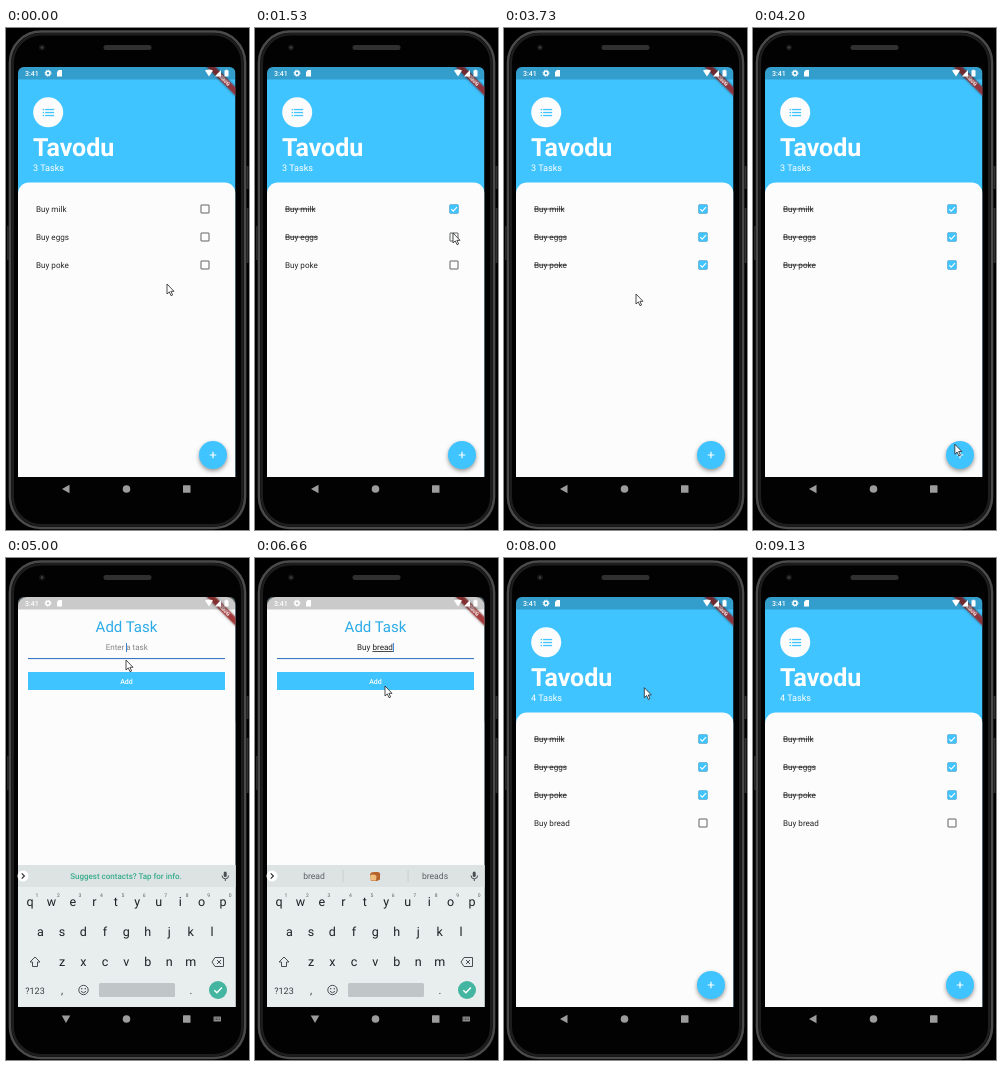
Animation of 243 by 502 pixels, one loop 9200 ms. Source, as an HTML page:

```html
<!DOCTYPE html>
<html lang="en">
<head>
<meta charset="utf-8">
<style>
html, body { margin: 0; width: 100%; height: 100%; overflow: hidden; background: #000; }
svg { display: block; width: 243px; height: 502px; font-family: Roboto, sans-serif; }
text { white-space: pre; text-rendering: geometricPrecision; }
.mid { text-anchor: middle; }
.done { text-decoration: line-through; }
.line { fill: none; stroke: #4a4e50; stroke-width: 1; }
</style>
</head>
<body>
<svg id="stage" viewBox="0 0 243 502"></svg>
<script>
const LOOP = 9200, BLUE = '#40c4ff', PAPER = '#fcfcfc';
const TOGGLES = [850, 1510, 2660];
const TYPED = 'Buy bread', TYPE_START = 5190, TYPE_STEP = 125;
const SUBMIT = 7260;
// Pointer stops: time, x, y
const PATH = [
  [0, 161, 256], [60, 161, 256], [600, 198, 178], [1200, 198, 178], [1330, 198, 205],
  [2130, 198, 205], [2460, 198, 234], [3530, 198, 234], [3730, 132, 266], [3860, 132, 266],
  [4250, 205, 423], [4480, 205, 423], [5000, 120, 102], [6150, 120, 102], [6460, 130, 128],
  [7250, 130, 128], [7460, 138, 124], [7900, 138, 124], [8460, 165, 190]
];

const $ = id => document.getElementById(id);
const clamp = v => Math.max(0, Math.min(1, v));
const attr = (id, values) => { for (const k in values) $(id).setAttribute(k, values[k]); };
const show = (id, on) => $(id).style.display = on ? '' : 'none';
const text = (x, y, size, fill, str, extra = '') =>
  `<text x="${x}" y="${y}" font-size="${size}" fill="${fill}" ${extra}>${str}</text>`;
const mid = (x, y, size, fill, str, extra = '') => text(x, y, size, fill, str, 'class="mid" ' + extra);
const rect = (x, y, w, h, fill, extra = '') =>
  `<rect x="${x}" y="${y}" width="${w}" height="${h}" fill="${fill}" ${extra}/>`;
const circle = (x, y, r, fill, extra = '') => `<circle cx="${x}" cy="${y}" r="${r}" fill="${fill}" ${extra}/>`;
const path = (d, fill, extra = '') => `<path d="${d}" fill="${fill}" ${extra}/>`;

const phone = () =>
  rect(0, 0, 243, 502, '#000') +
  rect(4, 3.5, 235, 496.5, '#020202', 'rx="31" stroke="#4a4a4a" stroke-width="2.6"') +
  rect(6.8, 6.3, 229.4, 491, 'none', 'rx="28.5" stroke="#1d1d1d" stroke-width="2.4"') +
  rect(97.5, 17, 48, 5, '#303030', 'rx="2.5"') +
  circle(36, 19.5, 3, '#151515') + circle(36, 19.5, 1.3, '#3c4046') +
  rect(1, 198, 2, 34, '#262626') + rect(240.5, 138, 2, 23, '#303030') + rect(240.5, 180, 2, 55, '#303030');

const task = (name, i) => {
  const y = 181 + 28 * i;
  return `<g id="task${i}">` + text(30, y + 2.7, 8.1, '#242424', name, `id="name${i}"`) +
    circle(199, y, 0, '#000', `id="ripple${i}"`) +
    rect(195, y - 4, 8, 8, 'none', 'rx=".2" stroke="#626262"') +
    `<g id="fill${i}">${rect(194.5, y - 4.5, 9, 9, BLUE, 'rx=".4"')}</g>` +
    path(`M196.3 ${y + .1}l1.9 2 3.8-4`, 'none', `id="tick${i}" stroke="#fff" stroke-width="1.1" pathLength="1" stroke-dasharray="1 2"`) + '</g>';
};

const home = () =>
  rect(12, 39, 217.5, 410, BLUE) + circle(42.2, 84.3, 15, PAPER) +
  [81.5, 84.5, 87.5].map(y => rect(36.6, y - .6, 1.5, 1.3, BLUE) + rect(39.1, y - .6, 9, 1.3, BLUE)).join('') +
  text(27, 127.5, 25, '#fff', 'Tavodu', 'font-weight="700"') +
  text(27, 142.5, 9.1, '#fff', '', 'id="count"') +
  path('M12 449V165.5a11 11 0 0 1 11-11H218.5a11 11 0 0 1 11 11V449Z', PAPER) +
  ['Buy milk', 'Buy eggs', 'Buy poke', TYPED].map(task).join('') +
  `<g style="filter:drop-shadow(0 2px 2px #0006)">${circle(207, 427, 14, BLUE)}</g>` +
  path('M203.7 427h6.6M207 423.7v6.6', 'none', 'stroke="#fff" stroke-width="1.2"');

const sheet = () =>
  rect(12, 39, 217.5, 412, '#757575') +
  path('M12 451V48a9 9 0 0 1 9-9H220.5a9 9 0 0 1 9 9V451Z', PAPER) +
  mid(120.5, 73.5, 15, '#2cabe8', 'Add Task') +
  mid(120.7, 92, 8, '#858585', 'Enter a task', 'id="hint"') +
  mid(120, 92, 8.1, '#222', '<tspan id="head"></tspan><tspan id="word" text-decoration="underline"></tspan>', 'id="entry"') +
  rect(120, 85, 1, 9, '#3d7fcf', 'id="caret"') +
  rect(22, 100, 197, 1.1, '#3977c4', 'id="underline"') + rect(22, 114, 197, 18, BLUE) +
  mid(120.5, 125.5, 7, '#fff', 'Add', 'font-weight="500"');

const status = () =>
  rect(12, 39, 217.5, 12.5, '#0003') +
  text(19, 47.8, 7, '#fff', '3:41', 'font-weight="500"') +
  circle(42, 45.2, 2, 'none', 'stroke="#fff" stroke-width="1.5"') +
  circle(42, 45.2, 3, 'none', 'stroke="#fff" stroke-width="1" stroke-dasharray="1.2 1.156"') +
  path('M51 44l1.8-2h3.2v6.5h-5Z', '#fff') +
  path('M199 42.5q4-2.2 8 0L203 48.5Z', '#fff') + path('M209 48.5l6-6.5v6.5Z', '#fff') +
  path('M218.5 42.6h1v-.8h2v.8h1v6h-4Z', '#fff');

const banner = () =>
  '<g transform="translate(229.5 39) rotate(45)" style="filter:drop-shadow(0 0 1.5px #0008)">' +
  rect(-21, 14.3, 42, 6, '#a52325', 'fill-opacity=".8"') +
  mid(0, 19.1, 5.1, '#fff', 'DEBUG', 'font-weight="900"') + '</g>';

const keyRow = (keys, x, y) => [...keys].map((k, i) => mid(x + 21.45 * i, y, 12.5, '#1d2123', k)).join('');

const keyboard = () =>
  rect(12, 307, 217.5, 142, '#e8edee') + rect(12, 307, 217.5, 22, '#dde2e2') +
  circle(17, 318, 5.5, '#fff') + path('M15.7 315.3l2.7 2.7-2.7 2.7', 'none', 'stroke="#333" stroke-width="1.2"') +
  rect(217.7, 313.5, 3, 5.5, '#4a4e50', 'rx="1.5"') + path('M216 317.5a3.3 3.3 0 0 0 6.6 0M219.3 321v2', 'none', 'stroke="#4a4e50"') +
  mid(120, 321, 8, '#36ad8c', 'Suggest contacts? Tap for info.', 'id="tip" font-weight="500"') +
  '<g id="words">' + rect(87.7, 312, .7, 12, '#c2c8c9') + rect(152.7, 312, .7, 12, '#c2c8c9') +
  [59, 120, 180].map((x, i) => mid(x, 321, 8.6, '#5b6163', '', `id="guess${i}"`)).join('') +
  '<g id="loaf">' + path('M115 317q0-3 4-3h4q3 1 2 3.5v4l-3 1.5h-6Z', '#b7642c') +
  path('M115 318.5q0-2 3-2t3.5 2l-.5 4h-5Z', '#efbd7c') + '</g></g>' +
  keyRow('qwertyuiop', 24, 348) + keyRow('asdfghjkl', 34.5, 378) + keyRow('zxcvbnm', 56, 408) +
  [...'1234567890'].map((n, i) => mid(31 + 21.45 * i, 338.5, 5, '#5b6163', n)).join('') +
  path('M29 399l5 5h-2.5v4.5h-5v-4.5h-2.5Z', 'none', 'class="line"') +
  path('M206 404l3-4.5h8.5v9h-8.5ZM211 402l4 4m0-4l-4 4', 'none', 'class="line"') +
  mid(29, 435.5, 9, '#3a3f41', '?123') + mid(56, 436, 11, '#3a3f41', ',') + mid(185, 436, 11, '#3a3f41', '.') +
  circle(77.5, 432, 4.7, 'none', 'class="line"') + circle(75.8, 430.7, .7, '#444') + circle(79.2, 430.7, .7, '#444') +
  path('M75 433.3q2.5 3 5 0', 'none', 'class="line"') +
  rect(93, 425, 76, 14, '#c0c5c7', 'rx="1.5"') +
  circle(212, 432, 9, '#43b5a0') + path('M208.3 432.2l2.6 2.6 5-5.2', 'none', 'stroke="#fff" stroke-width="1.4"');

const nav = () =>
  path('M56 461l7.5-4.3v8.6Z', '#9c9c9c', 'id="back"') +
  circle(120.5, 461, 3.8, '#9c9c9c') + rect(177, 457.3, 7.5, 7.5, '#9c9c9c', 'rx=".6"') +
  '<g id="switch">' + rect(207.5, 458.5, 7.5, 5, '#8c8c8c', 'rx=".5"') +
  path('M208.5 460h5.5M208.5 461.5h5.5', 'none', 'stroke="#111" stroke-width=".6" stroke-dasharray=".8 .7"') + '</g>';

$('stage').innerHTML =
  '<clipPath id="screen"><path d="M12 449V45a6 6 0 0 1 6-6H223.5a6 6 0 0 1 6 6V449Z"/></clipPath>' + phone() + nav() +
  `<g clip-path="url(#screen)">${home()}${rect(12, 39, 217.5, 410, '#000', 'id="shade"')}` +
  `<g id="sheet">${sheet()}</g>${banner()}${status()}</g>` +
  `<g id="keys">${keyboard()}</g>` +
  path('M0 0V10l2.3-2.1 1.7 3.8 1.6-.7-1.7-3.7H7Z', '#fff', 'id="pointer" stroke="#222" stroke-width=".8"');

function drawTasks(t) {
  const added = t >= SUBMIT;
  $('count').textContent = (added ? 4 : 3) + ' Tasks';
  show('task3', added);
  for (let i = 0; i < 4; i++) {
    const age = i < 3 ? t - TOGGLES[i] : -1, p = clamp(age / 200), r = clamp(age / 420);
    $('name' + i).setAttribute('class', age >= 0 ? 'done' : '');
    attr('fill' + i, { opacity: clamp(p * 2 - .2) });
    attr('tick' + i, { 'stroke-dashoffset': 1 - clamp(p * 2 - 1), opacity: p > .5 ? 1 : 0 });
    attr('ripple' + i, { r: 10 * Math.sqrt(r), opacity: age > 0 ? .12 * (1 - r) : 0 });
  }
}

function drawEntry(t) {
  const n = Math.max(0, Math.min(TYPED.length, Math.floor((t - TYPE_START) / TYPE_STEP) + 1));
  const typed = TYPED.slice(0, n), cut = n > 4 ? 4 : 0;
  const focused = t < SUBMIT, composing = focused && typed.slice(-1) !== ' ';
  $('head').textContent = composing ? typed.slice(0, cut) : typed;
  $('word').textContent = composing ? typed.slice(cut) : '';
  show('hint', !n);
  attr('underline', focused ? { height: 1.1, fill: '#3977c4' } : { height: .5, fill: '#999' });
  const width = n ? $('entry').getComputedTextLength() : 0;
  attr('caret', { x: 120 + width / 2 });
  const blinkFrom = n ? TYPE_START + TYPE_STEP * (n - 1) : 4600;
  const idle = n < TYPED.length ? t - blinkFrom : t - 6620;
  show('caret', focused && (idle < 0 || idle % 1000 < 500));

  const whole = n === TYPED.length;
  const guesses = n > 4 ? ['bread', whole ? '' : typed.slice(4), 'breads'] : ['But', 'Buy', 'Buying'];
  guesses.forEach((g, i) => $('guess' + i).textContent = g);
  show('tip', !n);
  show('words', n);
  show('loaf', whole);
}

function drawSheet(t) {
  const v = t < 6000 ? clamp((t - 4400) / 250) : 1 - clamp((t - 7302) / 200);
  const k = t < 6000 ? clamp((t - 4450) / 250) : 1 - clamp((t - 7340) / 270);
  attr('sheet', { transform: `translate(0 ${410 * (1 - v) ** 2})` });
  show('sheet', v > 0);
  attr('shade', { opacity: .54 * v ** 1.2 });
  attr('keys', { transform: `translate(0 ${29 * (1 - k)})`, opacity: k });
  const open = t > 4500 && t < 7340;
  attr('back', { transform: open ? 'rotate(-90 60 461)' : '' });
  show('switch', open);
}

function drawPointer(t) {
  const i = PATH.findIndex(p => p[0] > t);
  show('pointer', i > 0);
  if (i < 1) return;
  const [t0, x0, y0] = PATH[i - 1], [t1, x1, y1] = PATH[i];
  const u = (t - t0) / (t1 - t0), e = u * u * (3 - 2 * u);
  attr('pointer', { transform: `translate(${x0 + (x1 - x0) * e} ${y0 + (y1 - y0) * e})` });
}

const start = performance.now();
function frame() {
  const t = (performance.now() - start) % LOOP;
  drawTasks(t);
  drawEntry(t);
  drawSheet(t);
  drawPointer(t);
  requestAnimationFrame(frame);
}
frame();
</script>
</body>
</html>
```
